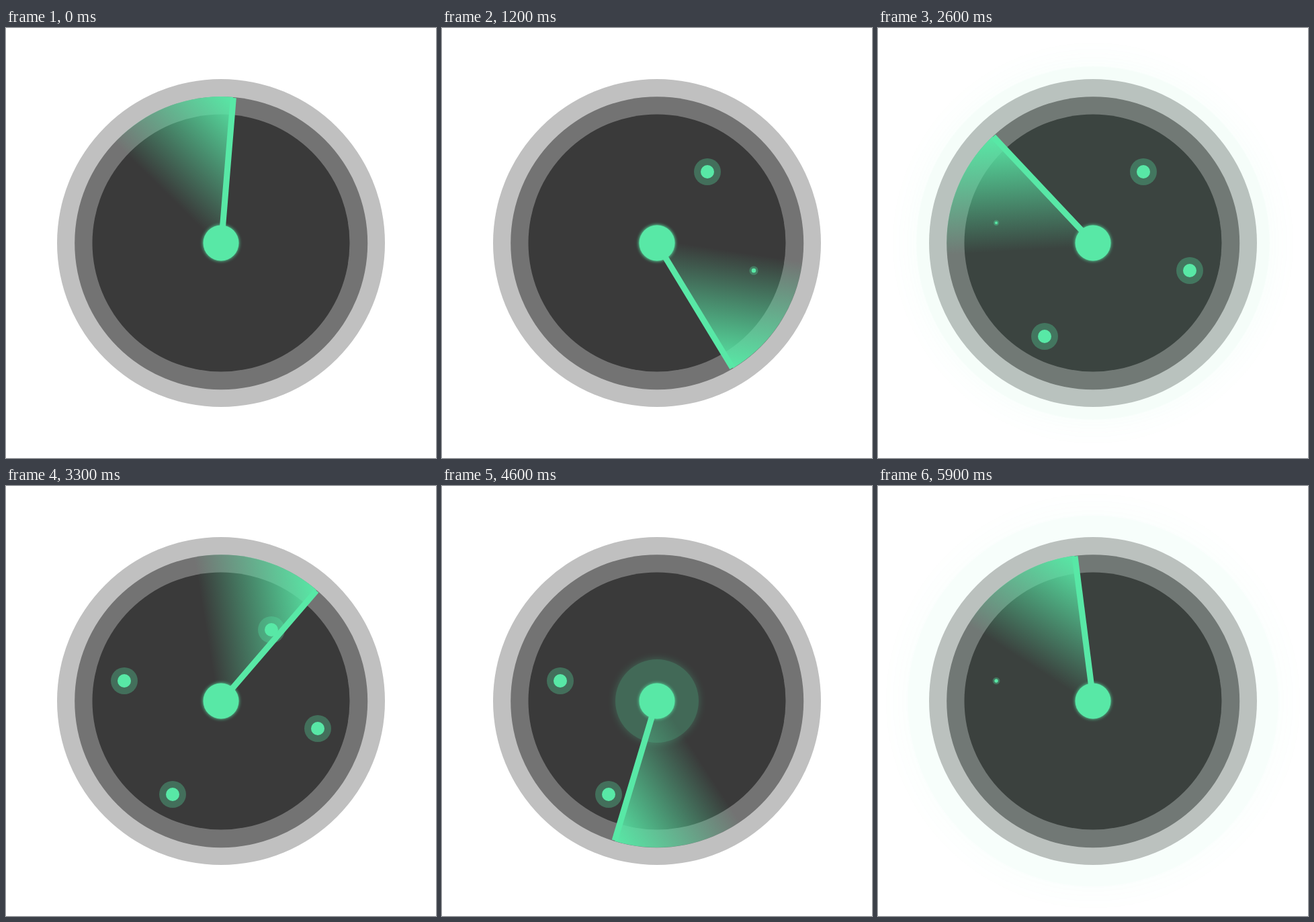
Animation, 640 px wide and 640 px high, one loop 6 s. Source, as an HTML page:

```html
<!DOCTYPE html>
<html lang="en">
<head>
<meta charset="utf-8">
<title>Radar</title>
<style>
  :root { --green: #58e8a6; }
  html, body { margin: 0; width: 100%; height: 100%; overflow: hidden; background: #fff; }
  #stage { position: relative; width: 640px; height: 640px; overflow: hidden; }
  #stage div { position: absolute; }
  .disc, .pulse, .hub, .blip { border-radius: 50%; transform: translate(-50%, -50%); left: 320px; top: 320px; }
  .rim { width: 488px; height: 488px; background: #c0c0c0; }
  .ring { width: 435.6px; height: 435.6px; background: #737373; }
  .face { width: 383px; height: 383px; background: #3a3a3a; }
  .pulse, .hub { width: 53px; height: 53px; background: var(--green); box-shadow: 0 0 5px var(--green); }
  #sweep { left: 320px; top: 320px; width: 0; height: 0; }
  .beam {
    right: 0; bottom: 0; width: 217.8px; height: 217.8px;
    border-radius: 100% 0 0 0;
    background: linear-gradient(40deg, rgba(88, 232, 166, 0) 44%, var(--green));
  }
  .hand { left: -4.5px; bottom: 0; width: 9px; height: 217.4px; background: var(--green); }
  .blip { width: 40px; height: 40px; background: rgba(88, 232, 166, .3); }
  .blip::after {
    content: ""; position: absolute; left: 10px; top: 10px; width: 20px; height: 20px;
    border-radius: 50%; background: var(--green);
  }
</style>
</head>
<body>
<div id="stage">
  <div class="disc rim"></div>
  <div class="disc ring"></div>
  <div class="disc face"></div>
</div>
<script>
const LOOP = 6000;
const TURN = 3000;
const PULSE_LIFE = 1300;
const PULSE_GROWTH = 0.22 / 26.5;
const PULSE_STARTS = [1200, 1527, 4440, 4767];
// x, y, time it starts to grow, time it starts to shrink
const BLIPS = [
  [395, 214, 330, 3330],
  [463.7, 361.2, 1014, 4014],
  [247.5, 459, 1783, 4800],
  [176.2, 290, 2482, 5484]
];
const BLIP_TIME = 570;

const stage = document.getElementById("stage");
const clamp = v => Math.min(1, Math.max(0, v));

function add(cls, parent = stage) {
  const el = document.createElement("div");
  el.className = cls;
  parent.append(el);
  return el;
}

function setScale(el, s) {
  el.style.visibility = s > 0 ? "visible" : "hidden";
  el.style.transform = `translate(-50%, -50%) scale(${s})`;
}

const pulses = PULSE_STARTS.map(() => add("pulse"));
const sweep = add("");
sweep.id = "sweep";
add("beam", sweep);
add("hand", sweep);
add("hub");
const blips = BLIPS.map(([x, y]) => {
  const el = add("blip");
  el.style.left = x + "px";
  el.style.top = y + "px";
  return el;
});

function draw(t) {
  sweep.style.transform = `rotate(${4.6 + t / TURN * 360}deg)`;

  pulses.forEach((el, i) => {
    const age = t - PULSE_STARTS[i];
    const alive = age > 0 && age < PULSE_LIFE;
    el.style.opacity = alive ? 0.31 * (1 - age / PULSE_LIFE) : 0;
    setScale(el, alive ? 1 + age * PULSE_GROWTH : 0);
  });

  blips.forEach((el, i) => {
    const [, , grow, shrink] = BLIPS[i];
    setScale(el, clamp((t - grow) / BLIP_TIME) - clamp((t - shrink) / BLIP_TIME));
  });
}

const start = performance.now();
function tick() {
  draw((performance.now() - start) % LOOP);
  requestAnimationFrame(tick);
}
tick();
</script>
</body>
</html>
```
